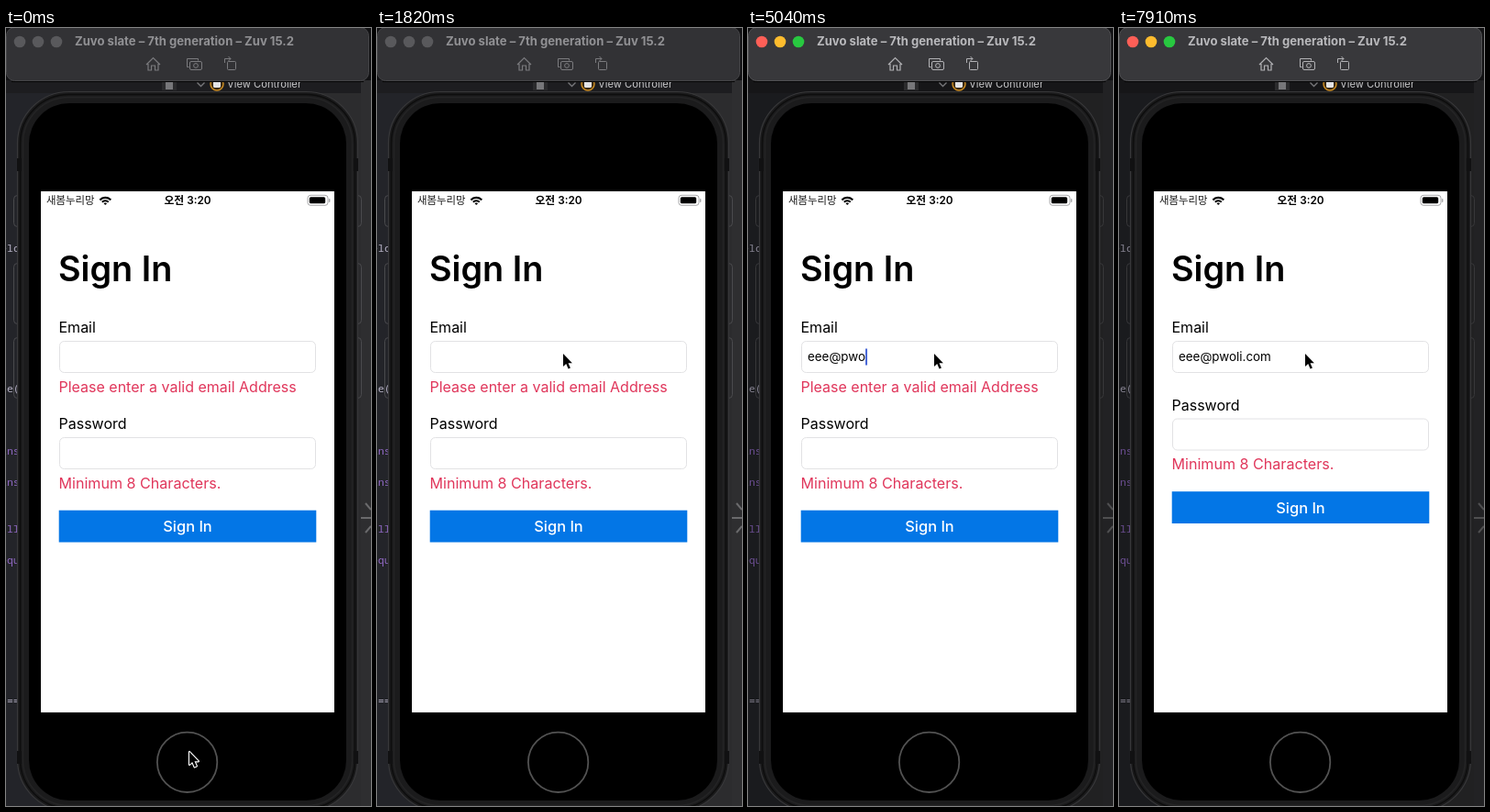
An HTML page with a canvas that plays this animation: 398 by 848 pixels, repeating every 8000 ms.

```html
<!DOCTYPE html>
<html lang="ko">
<head>
<meta charset="utf-8">
<title>Sign In</title>
<style>
  html, body { margin: 0; width: 100%; height: 100%; overflow: hidden; background: #1c1c1e; }
  canvas { display: block; }
</style>
</head>
<body>
<canvas id="stage" width="398" height="848"></canvas>
<script>
const ctx = document.getElementById('stage').getContext('2d');
const LOOP = 8000, STEP = 70;
const ACTIVE_AT = 2030, CARET_AT = 2310, TAP_END = 2440;
const BLINK = 1050, BLINK_DELAY = 570;
const HIDDEN_ROW = 20.5, LINE = 17;
const UI = 'Inter, "Noto Sans CJK KR", "Noto Sans CJK", sans-serif';
const MONO = '"Noto Sans Mono", "DejaVu Sans Mono", monospace';

// Bursts of typing, each with an even rhythm.
const BURSTS = [
  { start: 3570, gap: 175, keys: 'eee' },
  { start: 4340, gap: 0, keys: '@' },
  { start: 4790, gap: 125, keys: 'pwoli' },
  { start: 5570, gap: 170, keys: '.com' }
];
const KEYS = BURSTS.flatMap(({ start, gap, keys }) =>
  [...keys].map((char, i) => ({ char, at: start + gap * i })));
const VALID_AT = KEYS.at(-1).at;

// Pointer strokes; each begins where the previous one ended.
const STROKES = [
  { start: 0, end: 420, to: [213, 567], bow: 2 },
  { start: 490, end: 1050, to: [190, 384], bow: -12 },
  { start: 1540, end: 1820, to: [203, 355], bow: 9 }
];

function text(str, x, y, font, color, align = 'left') {
  ctx.font = font;
  ctx.fillStyle = color;
  ctx.textAlign = align;
  ctx.fillText(str, x, y);
}

function rect(x, y, w, h, color) {
  ctx.fillStyle = color;
  ctx.fillRect(x, y, w, h);
}

function round(x, y, w, h, r, fill, stroke, width = 1) {
  ctx.beginPath();
  ctx.roundRect(x, y, w, h, r);
  paint(fill, stroke, width);
}

function disc(x, y, r, fill, stroke, width = 1) {
  ctx.beginPath();
  ctx.arc(x, y, r, 0, Math.PI * 2);
  paint(fill, stroke, width);
}

function paint(fill, stroke, width) {
  if (fill) { ctx.fillStyle = fill; ctx.fill(); }
  if (stroke) { ctx.strokeStyle = stroke; ctx.lineWidth = width; ctx.stroke(); }
}

function line(path, color, width = 1) {
  ctx.strokeStyle = color;
  ctx.lineWidth = width;
  ctx.stroke(new Path2D(path));
}

function drawEditor(active) {
  rect(0, 0, 398, 848, '#232429');
  rect(186, 57, 212, 791, '#2c2c2e');
  rect(0, 57, 398, 14, '#1d1d20');
  rect(387, 57, 11, 791, '#2e2e30');
  for (const y of [182, 256, 337]) round(8.5, y + .5, 379, y < 200 ? 34 : 66, 4, null, '#4a4a4d');
  rect(388, 322, 10, 90, '#2e2e30');

  const code = { 0: 'elc', 9: 'ne(', 13: 'ins', 15: 'ins', 18: 'all', 20: 'equ', 29: ' ==' };
  for (const [row, str] of Object.entries(code)) {
    const keyword = row > 9 && row < 29;
    text(str, -6, 244 + LINE * row, '11.5px ' + MONO, keyword ? '#8f68c2' : '#b5b1c4');
  }
  line('M392 518l6 7M387 534h11M392 550l6-7', '#6a6a6c', 2);

  if (active) rect(0, 57, 398, 791, 'rgba(0,0,0,.26)');

  rect(170, 57, 16, 11, '#2b2b2d');
  rect(174, 57, 8, 10, '#77777a');
  line('M208.5 59.5l4 4l4-4', '#77777a', 1.3);
  disc(230, 61, 7, '#3a2a10', '#c98a22', 1.5);
  round(226, 57, 8, 8, 1.5, '#e4e4e6');
  text('View Controller', 241, 65, '11.2px ' + UI, '#c6c6c8');
}

function drawToolbar(active) {
  const ink = active ? '#b2b2b5' : '#7b7b7e';
  const lights = active ? ['#fe5f57', '#febc2e', '#28c840'] : Array(3).fill('#59595c');
  rect(0, 0, 398, 57, '#111113');
  round(.5, -.5, 395, 58, 9, active ? '#38383b' : '#323235', active ? '#505053' : '#444447');
  rect(6, 58, 384, 1, '#050505');
  lights.forEach((color, i) => disc(15 + 20 * i, 15, 6.3, color));
  text('Zuvo slate – 7th generation – Zuv 15.2', 75, 19, '700 13.1px ' + UI, active ? '#b9b9bc' : '#919194');

  line('M153 40l7.5-7.5l7.5 7.5M155 39v7h3.5v-5h4v5h3.5v-7', ink, 1.2);
  line('M199.5 42.5h-2v-9h12v2', ink);
  round(200.5, 36.5, 13, 9, 1.5, null, ink);
  disc(207, 41, 2.4, null, ink);
  round(241.5, 36.5, 9, 9, 1, null, ink);
  line('M238.5 38v-4.5h6.5M242.5 31l2.5 2.5l-2.5 2.5', ink);
}

function drawDevice() {
  round(12.5, 69.5, 371, 784, 56, '#1b1b1c', '#38383a', 1.2);
  round(15.5, 72.5, 365, 778, 53, null, '#0d0d0d', 1.5);
  round(18.5, 75.5, 359, 772, 50, null, '#242425', 1.5);
  for (const x of [12, 379]) {
    for (const y of [142, 788]) rect(x, y, 5, 14, '#111112');
  }
  round(25, 82, 346, 760, 44, '#000');
  rect(38, 178, 320, 568, '#fff');
  disc(197.6, 800.3, 32.7, null, '#525252', 1.8);
}

function drawStatusBar() {
  text('새봄누리망', 44, 192, '11.4px ' + UI, '#161616');
  for (const r of [1.4, 4.7, 8.1]) {
    ctx.beginPath();
    ctx.arc(108.3, 193, r, -Math.PI * .76, -Math.PI * .24);
    paint(null, '#000', 2.1);
  }
  text('오전 3:20', 198, 192.3, '600 11.8px ' + UI, '#000', 'center');
  round(329, 182.3, 22, 11, 3, null, '#a8a8aa');
  round(330.8, 184.2, 17.4, 7.1, 1.6, '#000');
  round(352, 186, 1.4, 4, 1, '#a8a8aa');
}

function drawField(y) {
  round(58.5, y + .5, 279, 34, 5, '#fff', '#e2e2e4');
}

function caretAlpha(t, lastInput) {
  if (t < CARET_AT) return 0;
  const idle = t - lastInput - BLINK_DELAY;
  if (idle < 0) return 1;
  const phase = idle % BLINK;
  const fadeOut = 1 - phase / 210, fadeIn = (phase - 420) / 140;
  return Math.min(1, Math.max(0, fadeOut, fadeIn));
}

function drawForm(t) {
  const body = '16px ' + UI, alert = '#e0365b';
  const valid = t >= VALID_AT;
  const pressed = KEYS.filter(key => key.at <= t);
  const typed = pressed.map(key => key.char).join('');

  text('Sign In', 57, 276.3, '600 37.8px ' + UI, '#000');
  text('Email', 57.5, 332, body, '#000');
  drawField(341);
  text(typed, 65, 363.3, '13.4px ' + UI, '#000');
  const caretX = 65 + ctx.measureText(typed).width;
  ctx.globalAlpha = caretAlpha(t, pressed.at(-1)?.at ?? TAP_END);
  rect(caretX, 349.5, 2, 18, '#4565d6');
  ctx.globalAlpha = 1;
  if (!valid) text('Please enter a valid email Address', 57.5, 396.5, body, alert);

  ctx.save();
  if (valid) ctx.translate(0, -HIDDEN_ROW);
  text('Password', 57.5, 437, body, '#000');
  drawField(446);
  text('Minimum 8 Characters.', 57.5, 501.5, '16.1px ' + UI, alert);
  rect(57.7, 525.7, 280.6, 34.8, '#0376e6');
  text('Sign In', 198, 549, '500 16.4px ' + UI, '#fff', 'center');
  ctx.restore();
}

function pointerAt(t) {
  let [x, y] = [200, 789];
  for (const { start, end, to, bow } of STROKES) {
    const k = Math.min(1, Math.max(0, (t - start) / (end - start)));
    const ease = 1 - (1 - k) ** 1.85;
    x += (to[0] - x) * ease + bow * Math.sin(Math.PI * k);
    y += (to[1] - y) * ease;
  }
  return [x, y];
}

function drawPointer(t) {
  const arrow = new Path2D('M0 0v14l3.2-2.9l2.4 5.4l2.3-1l-2.4-5.2h4.4z');
  ctx.save();
  ctx.translate(...pointerAt(t));
  ctx.lineJoin = 'round';
  ctx.strokeStyle = '#fff';
  ctx.lineWidth = 2.2;
  ctx.stroke(arrow);
  ctx.fillStyle = '#000';
  ctx.fill(arrow);
  ctx.restore();
}

function draw(now) {
  const t = Math.floor((now % LOOP) / STEP) * STEP;
  const active = t >= ACTIVE_AT;
  drawEditor(active);
  drawToolbar(active);
  drawDevice();
  drawStatusBar();
  drawForm(t);
  drawPointer(t);
}

const start = performance.now();
function tick() {
  draw(performance.now() - start);
  requestAnimationFrame(tick);
}
tick();
</script>
</body>
</html>
```
